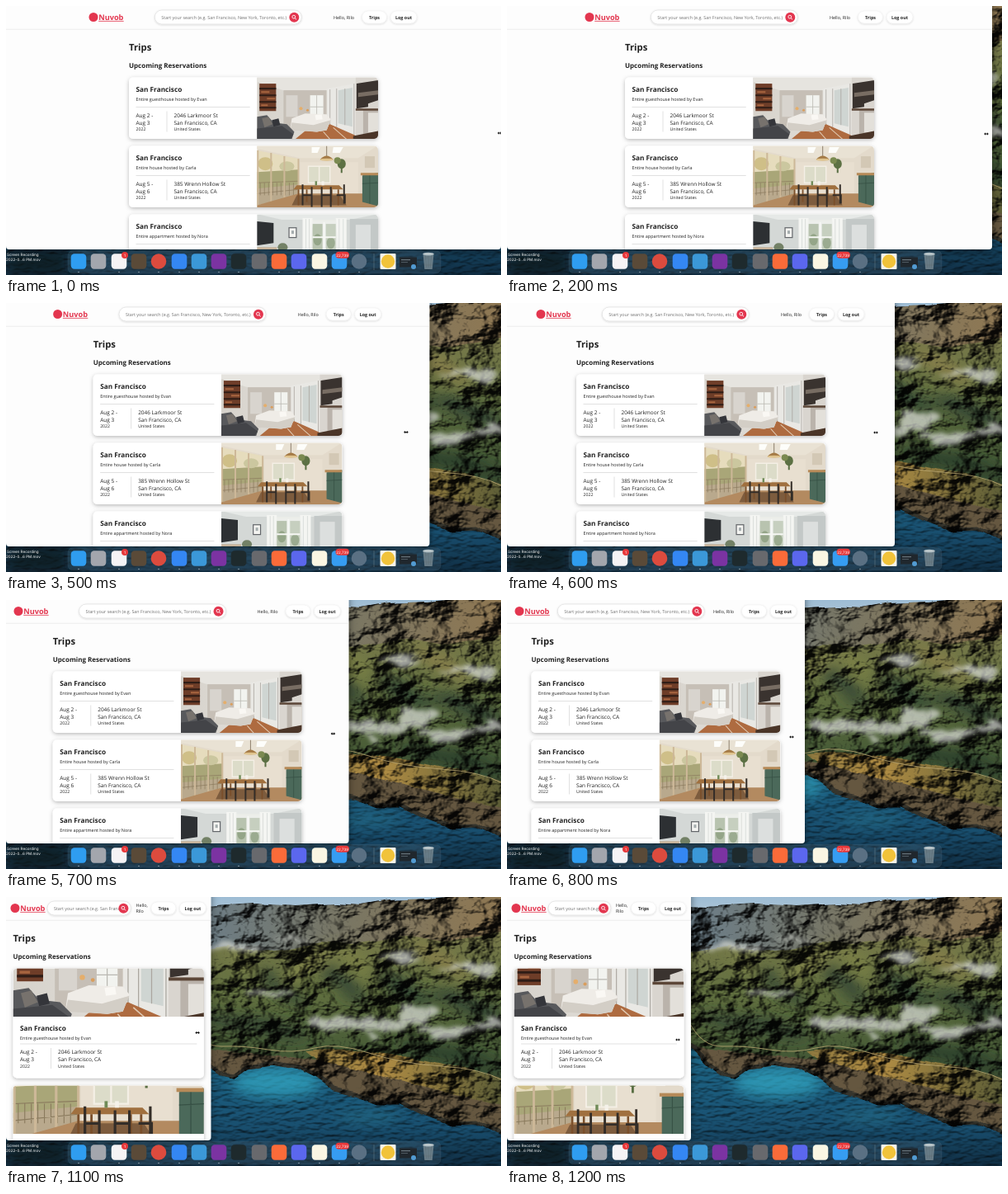
An HTML page that plays this animation: 600x326 px, repeating every 1300 ms.

```html
<!DOCTYPE html>
<html lang="en">
<head>
<meta charset="utf-8">
<title>Responsive trips page</title>
<style>
  html, body { margin: 0; width: 100%; height: 100%; overflow: hidden; background: #10222f; }
  svg.layer { position: absolute; left: 0; top: 0; will-change: transform; }
  text { font-family: "Open Sans", "Noto Sans", sans-serif; text-rendering: geometricPrecision; white-space: pre; }
  .desk text { font-family: Inter, "Open Sans", sans-serif; }
</style>
</head>
<body>
<svg class="layer" width="600" height="326" viewBox="0 0 600 326">
  <defs>
    <linearGradient id="sky" x2="0" y2="1"><stop stop-color="#9dbcd4"/><stop offset="1" stop-color="#d3dbe0"/></linearGradient>
    <linearGradient id="far"><stop stop-color="#5d7282"/><stop offset=".5" stop-color="#69685a"/><stop offset="1" stop-color="#806a48"/></linearGradient>
    <linearGradient id="hills" x2="0" y2="1"><stop stop-color="#6b6b42"/><stop offset=".3" stop-color="#566338"/><stop offset=".6" stop-color="#3d4f30"/><stop offset="1" stop-color="#2f3d2b"/></linearGradient>
    <linearGradient id="field"><stop stop-color="#7c6a38"/><stop offset=".35" stop-color="#9d7d3c"/><stop offset="1" stop-color="#4d5030"/></linearGradient>
    <linearGradient id="sea" x2="0" y2="1"><stop offset=".55" stop-color="#1d6685"/><stop offset=".85" stop-color="#184c6b"/><stop offset="1" stop-color="#0f2b3f"/></linearGradient>
    <filter id="relief" x="0" y="0" width="100%" height="100%" color-interpolation-filters="sRGB">
      <feTurbulence type="fractalNoise" baseFrequency=".017 .026" numOctaves="5" seed="4" result="noise"/>
      <feDisplacementMap in="SourceGraphic" in2="noise" scale="8" xChannelSelector="R" yChannelSelector="G" result="ragged"/>
      <feDiffuseLighting in="noise" surfaceScale="26" diffuseConstant="1.2" lighting-color="#fff" result="light">
        <feDistantLight azimuth="215" elevation="45"/>
      </feDiffuseLighting>
      <feComposite in="ragged" in2="light" operator="arithmetic" k1="1.05" k2=".08"/>
    </filter>
    <filter id="ripple" x="0" y="0" width="100%" height="100%" color-interpolation-filters="sRGB">
      <feTurbulence type="fractalNoise" baseFrequency=".09 .2" numOctaves="2" seed="2" result="noise"/>
      <feDiffuseLighting in="noise" surfaceScale="1.6" diffuseConstant="1.2" lighting-color="#fff" result="light">
        <feDistantLight azimuth="250" elevation="50"/>
      </feDiffuseLighting>
      <feComposite in="SourceGraphic" in2="light" operator="arithmetic" k1="1.05"/>
    </filter>
    <filter id="mist" x="-20%" y="-60%" width="140%" height="220%">
      <feTurbulence type="fractalNoise" baseFrequency=".035 .07" numOctaves="3" seed="8"/>
      <feDisplacementMap in="SourceGraphic" scale="26" xChannelSelector="R" yChannelSelector="G" result="torn"/>
      <feGaussianBlur in="torn" stdDeviation="2.6"/>
    </filter>
    <filter id="soft" x="-40%" y="-80%" width="180%" height="260%"><feGaussianBlur stdDeviation="8"/></filter>
  </defs>
  <g id="wallpaper"></g>
</svg>
<svg class="layer" width="600" height="326" viewBox="0 0 600 326">
  <defs>
    <linearGradient id="room" x2="1"><stop stop-color="#d6d2cb"/><stop offset="1" stop-color="#e8e5e0"/></linearGradient>
    <filter id="shade" x="-20%" y="-30%" width="140%" height="170%"><feDropShadow dx="0" dy="1.5" stdDeviation="2.4" flood-opacity=".27"/></filter>
    <filter id="lift" x="-20%" y="-40%" width="140%" height="200%"><feDropShadow dx="0" dy=".8" stdDeviation=".9" flood-opacity=".16"/></filter>
    <filter id="winShade" x="-10%" y="-10%" width="120%" height="120%"><feDropShadow dx="0" dy="3" stdDeviation="5" flood-opacity=".5"/></filter>
    <g id="photo0"></g><g id="photo1"></g><g id="photo2"></g>
    <clipPath id="pane"><rect id="paneRect" y="-10" height="305" rx="4"/></clipPath>
  </defs>
  <g id="window"></g>
  <g id="dock" class="desk"></g>
  <path id="cursor" d="M-2.8 0L-.9-1.7V-.6H.9V-1.7L2.8 0L.9 1.7V.6H-.9V1.7Z" fill="#111"/>
</svg>
<script>
const $ = id => document.getElementById(id);
const STEP = 100, STEPS = 13;
const INK = '#222', RED = '#e3364f';

// One key every 200 ms
const WIDTHS = [600, 588, 548, 470, 361, 283.5, 223];
const CURSOR_X = [598.5, 581, 518, 447, 345, 267, 207];
const CURSOR_Y = [154, 155, 157, 157, 166, 157, 173];

function spline(keys, t) {
  const i = Math.min(Math.floor(t), keys.length - 2), u = t - i;
  const at = k => keys[Math.max(0, Math.min(keys.length - 1, k))];
  const [a, b, c, d] = [at(i - 1), at(i), at(i + 1), at(i + 2)];
  return b + u / 2 * (c - a + u * (2 * a - 5 * b + 4 * c - d + u * (3 * (b - c) + d - a)));
}

const rect = (x, y, w, h, fill, extra = '') =>
  `<rect x="${x}" y="${y}" width="${w}" height="${h}" fill="${fill}" ${extra}/>`;
const circle = (x, y, r, fill, extra = '') => `<circle cx="${x}" cy="${y}" r="${r}" fill="${fill}" ${extra}/>`;
const oval = (x, y, rx, ry, fill, extra = '') =>
  `<ellipse cx="${x}" cy="${y}" rx="${rx}" ry="${ry}" fill="${fill}" ${extra}/>`;
const path = (d, fill, extra = '') => `<path d="${d}" fill="${fill}" ${extra}/>`;
const line = (d, color, width) => path(d, 'none', `stroke="${color}" stroke-width="${width}"`);
const text = (x, y, size, str, extra = '') =>
  `<text x="${x}" y="${y}" font-size="${size}" fill="${INK}" ${extra}>${str}</text>`;
const bold = (x, y, size, str, extra = '') => text(x, y, size, str, `font-weight="700" ${extra}`);
const tilted = (angle, x, y, rx, ry, fill) => oval(x, y, rx, ry, fill, `transform="rotate(${angle} ${x} ${y})"`);

function drawWallpaper() {
  const coast = 'M180 160L226 182L246 202L262 213L276 216L292 205L322 201L354 207L376 218L396 232L424 238L450 248L478 248L505 261L540 274L570 273L610 292';
  const mists = [[275, 62, 36, 3.5], [350, 51, 20, 2.5], [480, 72, 24, 3], [560, 86, 34, 5],
    [318, 117, 34, 4], [400, 153, 32, 7], [442, 156, 44, 9], [495, 142, 22, 13], [535, 165, 32, 7], [585, 155, 18, 5]];
  $('wallpaper').innerHTML =
    rect(0, 0, 600, 326, 'url(#sea)', 'filter="url(#ripple)"') +
    rect(0, 0, 600, 60, 'url(#sky)') +
    oval(328, 225, 54, 18, '#32a6c2', 'opacity=".75" filter="url(#soft)"') +
    oval(440, 266, 40, 8, '#2f8298', 'opacity=".35" filter="url(#soft)"') +
    `<g filter="url(#relief)">` +
      path('M180 9L240 12L300 8L350 11L400 8L430 10L465 4L510 2L610 -6V120H180Z', 'url(#far)') +
      path('M180 70L230 66L268 60L310 66L345 62L382 54L420 58L450 54L490 46L535 54L610 40V292L' +
        coast.slice(1).split('L').reverse().join('L') + 'Z', 'url(#hills)') +
      `<g filter="url(#soft)" opacity=".7">` +
        tilted(35, 300, 88, 36, 8, '#7b8044') + tilted(-38, 366, 82, 34, 9, '#858548') +
        tilted(40, 430, 84, 38, 8, '#75793f') + tilted(30, 530, 78, 40, 9, '#827445') +
        tilted(35, 330, 108, 40, 9, '#22332a') + tilted(38, 408, 104, 40, 10, '#22332a') +
        tilted(28, 480, 112, 44, 10, '#1f3029') + tilted(20, 560, 130, 50, 12, '#22332a') +
        tilted(10, 300, 155, 70, 9, '#22332a') + tilted(14, 540, 192, 70, 9, '#1f2d24') +
      `</g>` +
      path('M365 188Q420 182 478 192T610 222V254L540 240L500 230L440 216L390 208Z', 'url(#field)') +
      path('M376 198L440 214L500 228L550 240L610 254V292L570 273L540 274L505 261L478 248L450 248L424 238L396 232L376 218L354 207L322 201L292 205L276 216L262 213L246 202L226 182L270 188L330 192Z', '#594d39') +
      line(coast, '#302f28', 5) +
    `</g>` +
    line('M220 150Q236 182 262 181T318 185T374 183T440 189T528 205T602 222', '#bba973', .8) +
    `<g filter="url(#mist)" opacity=".72">${mists.map(m => oval(...m, '#d9dcd6')).join('')}</g>` +
    rect(0, 295, 75, 31, '#0b1318', 'opacity=".7" filter="url(#soft)"');
}

// Interiors are drawn in a 146 x 75 space
function drawPhotos() {
  $('photo0').innerHTML =
    rect(0, 0, 146, 75, 'url(#room)') +
    path('M0 0H146V8L84 16H32L0 6Z', '#e6e4df') +
    rect(32, 16, 53, 48, '#c6bfb6') + rect(35, 22, 14, 26, '#d8d4ce') +
    rect(64, 22, 16, 28, '#f2f3ef') + line('M72 22V50M64 36H80', '#b9b8b2', .8) +
    circle(53, 38, 2, '#e5ae6b') + circle(61, 40, 1.5, '#d99e5e') +
    path('M84 14L118 8V70L84 62Z', '#e9e8e4') + path('M98 16L115 13V60L98 56Z', '#cfd5d2') +
    line('M88 15V62M96 14V64M106 14V58M117 8V70', '#aaa69f', .8) +
    rect(3, 8, 20, 33, '#6e3d28') + line('M3 14H23M3 22H23M3 30H23M3 37H23', '#2f1d16', 2) + line('M5 18H15M12 26H22M5 34H13', '#a8653f', 2) +
    path('M58 65L88 57L118 70V75H46Z', '#ae6b40') + line('M92 61L108 75M80 66L88 75', '#e0c9b1', 1) +
    path('M42 50L58 44L84 45L89 51L84 64L72 66L40 63Z', '#efece7') + path('M42 55L68 58L89 52L84 64L72 66L40 64Z', '#d3cec6') +
    path('M70 46L78 45L79 51L71 52Z', '#faf8f4') +
    path('M0 48L12 46L20 55L36 57L45 66L42 75H0Z', '#58595c') + path('M0 62L30 59L44 69L40 75H0Z', '#434448') +
    path('M6 50L14 48L19 57L9 61Z', '#77726d') + path('M18 52L26 50L28 58L20 60Z', '#34353a') +
    rect(119, 0, 27, 75, '#d9d5cf') + path('M120 8L146 4V28L134 32V36L120 38Z', '#3a332f') +
    path('M122 19L146 16V21L122 24Z', '#786d63') + rect(128, 39, 18, 36, '#bab3ab') + rect(134, 43, 12, 24, '#e3e0da') +
    rect(119, 38, 27, 2.5, '#5c4738') + path('M116 71L146 65V75H116Z', '#4a3528');
  $('photo1').innerHTML =
    rect(0, 0, 146, 75, '#e3dacb') +
    path('M0 0H146L122 15H52L0 4Z', '#e9e2d4') + path('M66 2L76 2L73 9L66 9ZM92 2H104L100 9H91Z', '#fdfdfa') +
    path('M0 6L50 16V62L0 72Z', '#e6dcbd') + path('M0 32L50 29V50L0 56Z', '#a9a678') +
    oval(10, 22, 9, 8, '#cfbf88') + oval(36, 25, 9, 6, '#cbc79f') +
    path('M0 52L50 47V61L0 72Z', '#b9a98d') +
    line('M0 45L50 43M0 58L50 53' + [4, 9, 14, 19, 24, 29, 34, 39, 44].map(x => `M${x} 45V60`).join(''), '#8a7a5d', .7) +
    line('M1 6V72M17 9V69M33 13V66M50 16V62', '#cdb898', 2) +
    rect(52, 20, 70, 40, '#e8dfd0') + rect(62, 25, 26, 20, '#dcdcc9') + line('M62 25H88V45H62ZM75 25V45', '#f4efe5', 1.4) +
    path('M0 72L50 58H128L146 70V75H0Z', '#b38a60') + path('M48 60H100L108 72H42Z', '#7d5c3e') +
    line('M84 0V13', '#675640', .7) + path('M76 17Q84 8 92 17Z', '#a47a45') + oval(84, 17, 8, 1.5, '#dfc38d') +
    oval(102, 22, 5, 6, '#5d7144') + oval(97, 18, 4, 4, '#7b8a51') + line('M102 25V33', '#596e43', 2) +
    path('M48 48H99L104 53H44Z', '#a0703f') + line('M50 53V72M98 53V72M60 53V68M90 53V68', '#7a4f2b', 1.8) +
    line('M55 47V72M66 50V74M55 60H66M78 50V74M89 50V74M78 60H89M105 47V70M96 60H106V70', '#332d28', 2) +
    rect(70, 43, 2.4, 5, '#6f8b57') + rect(78, 43, 3, 5, '#f5f2ea') +
    path('M127 36L146 33V73L127 68Z', '#4b695a') + line('M136 35V70M127 46L146 45', '#375145', .8) + rect(125, 33, 21, 3, '#b68a58') +
    rect(130, 13, 12, 14, '#d3c8b5');
  $('photo2').innerHTML =
    rect(0, 0, 146, 75, '#d4d8d6') + path('M0 0H146L112 7H30Z', '#e6e9e7') +
    path('M0 9L20 11V35L0 38Z', '#2d3033') + rect(0, 40, 24, 35, '#c5b29a') +
    rect(38, 16, 10, 13, '#63666a') + rect(39.2, 17.2, 7.6, 10.6, '#f4f4f1') + rect(41.5, 20, 3, 4, '#a5adae') +
    rect(58, 7, 46, 48, '#eceeea') + rect(67, 12, 12, 36, '#b8c3af') + rect(83, 12, 12, 36, '#c6cfbf') +
    oval(73, 31, 5, 7, '#94a588') + oval(89, 35, 5, 7, '#9bab90') + line('M67 28H95M81 10V54', '#f6f7f4', 2) +
    path('M55 5H67Q66 36 62 58H55ZM95 5H108V58H100Q97 34 95 5Z', '#f4f5f2') + line('M59 6V58M63 6V50M99 6V50M104 6V58', '#d5d9d6', .8) +
    rect(112, 6, 34, 69, '#c3c8c7') + rect(119, 13, 18, 40, '#dcdfde') + oval(31, 40, 6, 5, '#738166') +
    rect(26, 50, 84, 25, '#b5aaa0');
}

function drawDock() {
  const icons = [
    [88, '#2f9df0'], [112, '#a3a6ad'], [137, '#f5f3f5'], [161, '#5a4a38'], [185, '#dc4b3e', true], [210, '#3487f3'],
    [234, '#3b98d8'], [258, '#7b33a2'], [282, '#1e2a2d'], [307, '#68696d'], [331, '#fa6b39'], [355, '#5b67ee'],
    [380, '#faf6e3'], [404, '#369df2'], [428, '#5a7083', true]];
  const label = (x, y, str, size, extra = '') => text(x, y, size, str, `style="fill:#fff" ${extra}`);
  const active = [88, 137, 161, 185, 210, 234, 258, 282, 331, 355, 380, 404, 428];
  $('dock').innerHTML =
    rect(75, 296.5, 452, 27.5, '#4a6577', 'rx="6" fill-opacity=".3" stroke="#6b8291" stroke-opacity=".3" stroke-width=".5"') +
    icons.map(([x, fill, round]) => round ? circle(x, 309.5, 9.3, fill)
      : rect(x - 9.3, 300.2, 18.6, 18.6, fill, 'rx="4.2"')).join('') +
    active.map(x => circle(x, 322.3, .6, '#dce5ea')).join('') +
    line('M446 300V320', '#71848f', .5) +
    rect(453.5, 300, 19, 19, '#f7f4e9', 'rx="1"') + circle(463, 309.5, 8.2, '#f1c33a') +
    rect(477, 304.5, 21, 12, '#20272d') + rect(479, 307, 11, 1.2, '#69757c') + rect(479, 310, 8, 1, '#505b62') + circle(494, 316, 3, '#529bd2') +
    path('M505.5 300.5H518.5L516.7 319H507.3Z', '#87969d', 'opacity=".7"') + oval(512, 300.5, 6.7, 1.8, '#b9c5c9') +
    line('M508.5 303L509.5 317M512 303V317M515.5 303L514.5 317', '#5f6f77', .6) +
    circle(144, 302, 4, '#e8383a') + label(144, 303.7, '1', 4.6, 'text-anchor="middle"') +
    rect(399.5, 297.8, 16.5, 8, '#e8383a', 'rx="4"') + label(407.7, 303.5, '22,739', 4.5, 'text-anchor="middle"') +
    label(1, 302.6, 'Screen Recording', 4.6) + label(0, 308.6, '2022-0...6 PM.mov', 4.6);
}

function header(w) {
  const narrow = w < 340, mid = w / 2;
  const left = narrow ? 5 : Math.max(mid - 200, 9);
  const right = narrow ? w - 6 : Math.min(mid + 198, w - 10);
  const hello = right - (narrow ? 85 : 101);
  const sx = narrow ? 50 : (left + 43 + hello) / 2 - 89.7;
  const sw = narrow ? hello - 6 - sx : 178;
  const pill = (x, width, str) =>
    rect(x, 6, width, 15, '#fff', 'rx="7.5" stroke="#ececec" stroke-width=".5" filter="url(#lift)"') +
    bold(x + width / 2, 15.6, 5.4, str, 'text-anchor="middle"');
  const bx = sx + sw - 9;
  return line(`M0 28.2H${w}`, '#e6e6e6', .7) +
    circle(left + 6, 13.5, 5.5, RED) +
    bold(left + 12.2, 17, 9.2, 'Nuvob', `style="fill:${RED}"`) + line(`M${left + 12.2} 18.4h30.5`, RED, .8) +
    rect(sx, 5, sw, 17, '#fff', 'rx="8.5" stroke="#d9d9d9" stroke-width=".6" filter="url(#lift)"') +
    `<svg x="${sx + 8}" y="5" width="${sw - 21}" height="17">` +
      text(0, 10.6, 5.38, 'Start your search (e.g. San Francisco, New York, Toronto, etc.)', 'style="fill:#6d6d6d"') + `</svg>` +
    circle(bx, 13.7, 6, RED) +
    circle(bx - .5, 13.2, 1.9, 'none', 'stroke="#fff" stroke-width=".9"') + line(`M${bx + .9} 14.6l1.8 1.8`, '#fff', 1) +
    (narrow ? text(hello, 11.8, 5.4, 'Hello,') + text(hello, 19.2, 5.4, 'Rilo') : text(hello, 15.6, 5.4, 'Hello, Rilo')) +
    pill(right - 66.5, 30, 'Trips') + pill(right - 32, 32, 'Log out');
}

const TRIPS = [
  ['guesthouse hosted by Evan', 'Aug 2 -', 'Aug 3', '2046 Larkmoor St'],
  ['house hosted by Carla', 'Aug 5 -', 'Aug 6', '385 Wrenn Hollow St'],
  ['appartment hosted by Nora', 'Aug 9 -', 'Aug 11', '617 Tarn Meadow St']];

function card(i, x, width, stacked) {
  const photoH = stacked ? 58.5 : 74.5;
  const height = stacked ? 133 : 74.5;
  const top = 86.5 + i * (height + (stacked ? 9 : 8.5));
  const bodyW = stacked ? width : width * .514;
  const photoX = stacked ? x : x + bodyW, photoW = stacked ? width : width - bodyW;
  const scale = Math.max(1, photoW / 146);
  const vw = photoW / scale, vh = photoH / scale;
  const view = `${73 - vw / 2} ${stacked ? 68 - vh : 37.5 - vh / 2} ${vw} ${vh}`;
  const y = stacked ? top + 58.5 : top, low = stacked ? y - 3 : y;
  const [stay, from, to, street] = TRIPS[i];
  const tx = x + 8.5, ax = x + 54.5;
  return rect(x, top, width, height, '#fff', 'rx="5" filter="url(#shade)"') +
    `<clipPath id="card${i}">${rect(x, top, width, height, '#000', 'rx="5"')}</clipPath>` +
    `<g clip-path="url(#card${i})"><svg x="${photoX}" y="${top}" width="${photoW}" height="${photoH}" viewBox="${view}" preserveAspectRatio="none"><use href="#photo${i}"/></svg></g>` +
    bold(tx, y + 17.4, 8.25, 'San Francisco') +
    text(tx, y + 28.4, 5.48, 'Entire ' + stay) +
    line(`M${tx} ${low + 36}H${x + bodyW - 8.5}`, '#d4d4d4', .7) +
    line(`M${x + 46} ${low + 41}v25`, '#d4d4d4', .7) +
    text(tx, low + 48.3, 6.5, from) + text(tx, low + 57.2, 6.5, to) + text(tx, low + 64.8, 5.2, '2022') +
    text(ax, low + 48.3, 6.45, street) + text(ax, low + 57.2, 6.45, 'San Francisco, CA') + text(ax, low + 64.8, 5.2, 'United States');
}

function render(step) {
  const t = step / 2, w = spline(WIDTHS, t);
  const stacked = w < 260;
  const width = stacked ? w - 17 : Math.min(302, w * .9);
  const x = (w - width) / 2;
  $('paneRect').setAttribute('width', w);
  $('window').innerHTML =
    rect(0, -10, w, 305, '#fdfdfd', 'rx="4" filter="url(#winShade)"') +
    `<g clip-path="url(#pane)">` + header(w) +
    bold(x, 53.6, 11.3, 'Trips') + bold(x, 75.4, 8, 'Upcoming Reservations') +
    TRIPS.map((_, i) => card(i, x, width, stacked)).join('') + `</g>`;
  $('cursor').setAttribute('transform', `translate(${spline(CURSOR_X, t)} ${spline(CURSOR_Y, t)})`);
}

drawWallpaper();
drawPhotos();
drawDock();

const start = performance.now();
let shown = -1;
function tick() {
  const step = Math.floor((performance.now() - start) / STEP) % STEPS;
  if (step !== shown) render(shown = step);
  requestAnimationFrame(tick);
}
tick();
</script>
</body>
</html>
```
